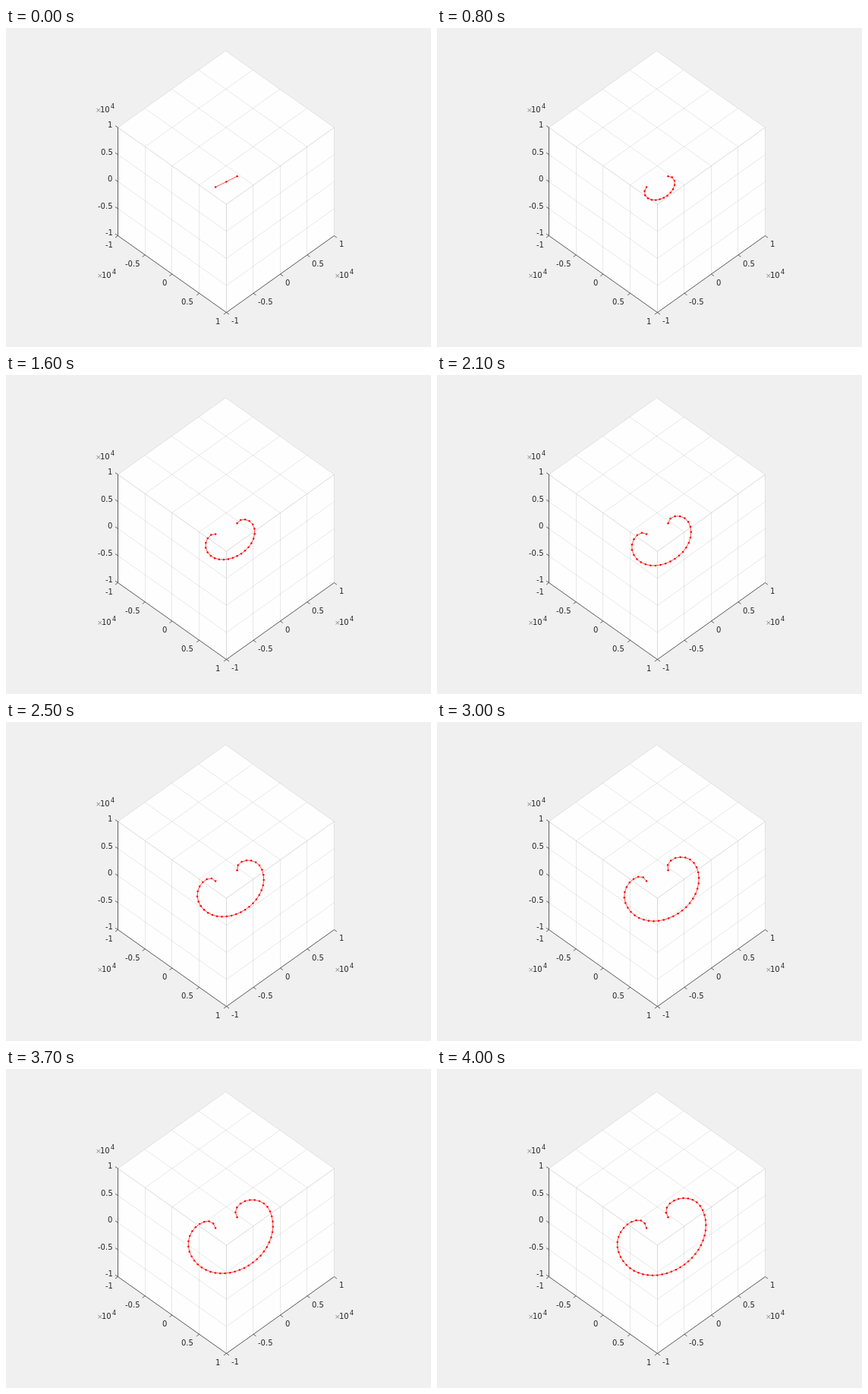
An HTML page with a canvas that plays this animation: 560 px wide and 420 px high, repeating every 4.1 s.

```html
<!DOCTYPE html>
<html>
<head>
<meta charset="utf-8">
<style>
html, body { margin: 0; width: 100%; height: 100%; overflow: hidden; background: #f0f0f0; }
canvas { display: block; }
</style>
</head>
<body>
<canvas id="stage" width="560" height="420"></canvas>
<script>
const ctx = document.getElementById('stage').getContext('2d');
const LOOP = 4100, STEP = 100;
const INK = '#262626', GRID = 'rgba(38,38,38,0.13)', RED = '#f00';

// Projected cube axes.
const AX = [142.9, 101], AY = [141.9, -101], AZ = [0, -142.5];
const LEFT = [147.5, 273.5], FRONT = [290.5, 374.5];

// Plane of the growing curve: centre between the pins, and two directions.
const CENTRE = [290.3, 202.4], U = [0.8165, -0.4082], V = [0.346, 0.873];
const PIN = 17.45;

const along = (p, v, k) => [p[0] + v[0] * k, p[1] + v[1] * k];
const toScreen = ([a, b]) => along(along(CENTRE, U, a), V, b);
const distance = (p, q) => Math.hypot(q[0] - p[0], q[1] - p[1]);

function bezier(p, q, r, s, k) {
  const j = 1 - k;
  return [0, 1].map(i => j * j * j * p[i] + 3 * j * j * k * q[i] + 3 * j * k * k * r[i] + k * k * k * s[i]);
}

// One half of the curve in its plane, from the pin round to the lowest point.
function halfCurve(t) {
  const wrap = Math.max(0, t - 0.5);              // seconds since it passed the half circle
  const depth = t / (0.0271 + 0.00735 * t);
  const width = PIN + wrap / (0.0455 + 0.0068 * wrap);
  const waist = 15 * (1 - Math.exp(-wrap / 0.4)); // depth of the widest point
  const turn = (120 - 160 * Math.exp(-wrap / 1.5)) * Math.PI / 180;
  const reach = 7.8 * wrap;

  const pin = [PIN, 0], side = [width, waist], bottom = [0, depth];
  const leave = [PIN + reach * Math.cos(turn), -reach * Math.sin(turn)];
  const arrive = [width, waist - 11 * wrap];
  const below = [width, waist + 0.56 * (depth - waist)];
  const beside = [0.56 * width, depth];

  const points = [];
  const samples = 60;
  for (let i = 0; i < samples; i++) points.push(bezier(pin, leave, arrive, side, i / samples));
  for (let i = 0; i <= samples; i++) points.push(bezier(side, below, beside, bottom, i / samples));
  return points;
}

// Points at equal distances along a path.
function spread(path, pieces) {
  const lengths = [0];
  for (let i = 1; i < path.length; i++) lengths.push(lengths[i - 1] + distance(path[i - 1], path[i]));
  const total = lengths[lengths.length - 1];
  const nodes = [];
  for (let n = 0, i = 1; n <= pieces; n++) {
    const goal = total * n / pieces;
    while (i < path.length - 1 && lengths[i] < goal) i++;
    const share = (goal - lengths[i - 1]) / (lengths[i] - lengths[i - 1] || 1);
    nodes.push([0, 1].map(k => path[i - 1][k] + (path[i][k] - path[i - 1][k]) * share));
  }
  return nodes;
}

function nodesAt(t) {
  const pieces = Math.round(1 + 7 * Math.pow(t, 0.88));
  const right = spread(halfCurve(t), pieces);
  const left = right.slice(0, -1).map(([a, b]) => [-a, b]);
  return [...left, ...right.reverse()].map(toScreen);
}

function stroke(points, color, width) {
  ctx.beginPath();
  points.forEach(p => ctx.lineTo(p[0], p[1]));
  ctx.strokeStyle = color;
  ctx.lineWidth = width;
  ctx.stroke();
}

function drawFace(origin, e1, e2) {
  const far = along(along(origin, e1, 1), e2, 1);
  ctx.fillStyle = '#fefefe';
  ctx.beginPath();
  [origin, along(origin, e1, 1), far, along(origin, e2, 1)].forEach(p => ctx.lineTo(p[0], p[1]));
  ctx.fill();
  for (const [side, across] of [[e1, e2], [e2, e1]]) {
    for (let k = 0; k <= 4; k++) {
      const start = along(origin, side, k / 4);
      if (across === AZ) start[0] = Math.floor(start[0]) + 0.5;
      stroke([start, along(start, across, 1)], GRID, 0.8);
    }
  }
}

function label(text, x, y, align = 'left', size = 10, color = INK) {
  ctx.font = size + 'px "DejaVu Sans", sans-serif';
  ctx.fillStyle = color;
  const shift = align === 'right' ? ctx.measureText(text).width : 0;
  ctx.fillText(text, Math.round(x - shift), Math.round(y));
}

function drawExponent(x, y) {
  label('×', x, y, 'left', 9, '#8a8a8a');
  label('10', x + 6, y);
  label('4', x + 20, y - 5, 'left', 8);
}

function drawAxis(origin, axis, tick, align, x, y, dx, dy) {
  stroke([origin, along(origin, axis, 1)], INK, 0.7);
  ['-1', '-0.5', '0', '0.5', '1'].forEach((text, i) => {
    const p = along(origin, axis, i / 4);
    stroke([p, along(p, tick, 1)], INK, 0.7);
    label(text, x + dx * i, y + dy * i, align);
  });
}

function drawPlot() {
  ctx.fillStyle = '#f0f0f0';
  ctx.fillRect(0, 0, 560, 420);
  drawFace(LEFT, AX, AZ);
  drawFace(FRONT, AY, AZ);
  drawFace(along(LEFT, AZ, 1), AX, AY);
  drawAxis(LEFT, AZ, [-3.5, -2.3], 'right', 140.8, 273.4, 0, -35.6);
  drawAxis(LEFT, AX, [-3.5, 2.5], 'right', 141.3, 288.7, 35.3, 25.25);
  drawAxis(FRONT, AY, [3.5, 2.5], 'left', 296.6, 389.4, 35.6, -25.25);
  drawExponent(118, 111);
  drawExponent(120, 329);
  drawExponent(433, 329);
}

function drawCurve(t) {
  const nodes = nodesAt(t);
  stroke(nodes, RED, 0.7);
  ctx.fillStyle = RED;
  for (const [x, y] of nodes) {
    ctx.beginPath();
    ctx.arc(x, y, 1.25, 0, 2 * Math.PI);
    ctx.fill();
  }
}

const begin = performance.now();
function frame() {
  const t = (performance.now() - begin) % LOOP;
  drawPlot();
  drawCurve(Math.floor(t / STEP) * STEP / 1000);
  requestAnimationFrame(frame);
}
frame();
</script>
</body>
</html>
```
